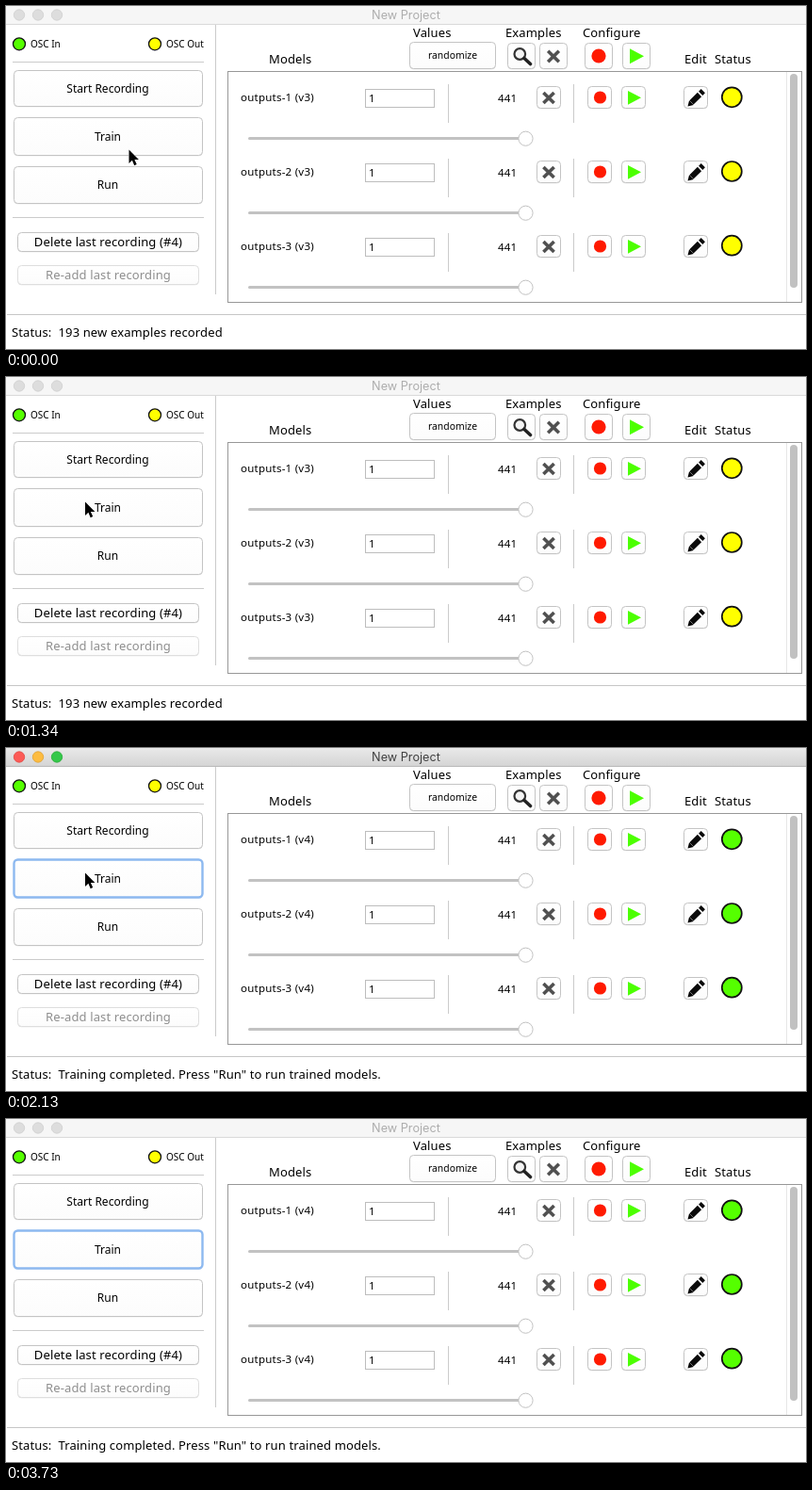
An HTML page for the animation above (3.83 s loop, 849 by 364 pixels).

```html
<!DOCTYPE html>
<html lang="en">
<head>
<meta charset="utf-8">
<title>New Project</title>
<style>
html, body { margin: 0; width: 100%; height: 100%; overflow: hidden; background: #fff; }
svg { display: block; width: 849px; height: 364px; }
text { font-family: "Noto Sans", "Open Sans", sans-serif; white-space: pre; fill: #000; }
.s10 { font-size: 10px; }
.s11 { font-size: 10.4px; }
.row { font-size: 11.5px; letter-spacing: .02em; }
.s12 { font-size: 12px; }
.s13 { font-size: 13px; letter-spacing: .01em; }
.title { font-family: Inter, Roboto, sans-serif; font-size: 12.7px; }
.mid { text-anchor: middle; }
</style>
</head>
<body>
<svg id="stage" viewBox="0 0 849 364">
  <defs>
    <linearGradient id="bar" x2="0" y2="1">
      <stop offset="0" stop-color="#e9e9e9"/><stop offset="1" stop-color="#d4d4d4"/>
    </linearGradient>
    <linearGradient id="face" x2="0" y2="1">
      <stop offset="0" stop-color="#fff"/><stop offset="1" stop-color="#fcfcfc"/>
    </linearGradient>
  </defs>
</svg>
<script>
const LOOP = 3830;
const GREEN = '#55ff00', YELLOW = '#ffff00', MAGENTA = '#ff00ff', RED = '#ff1a00';
const stage = document.getElementById('stage');

function add(tag, attrs, parent = stage) {
  const el = document.createElementNS('http://www.w3.org/2000/svg', tag);
  for (const k in attrs) el.setAttribute(k, attrs[k]);
  return parent.appendChild(el);
}
function label(str, x, y, cls, fill) {
  const el = add('text', { x, y, class: cls });
  el.textContent = str;
  if (fill) el.style.fill = fill;
  return el;
}
const box = (x, y, width, height, attrs) => add('rect', { x, y, width, height, ...attrs });
const dot = (cx, cy, r, fill, attrs) => add('circle', { cx, cy, r, fill, ...attrs });
const path = (d, attrs) => add('path', { d, ...attrs });
const hline = (x, y, w, fill = '#cbcbcb') => box(x, y, w, 1, { fill });
const vline = (x, y, h, fill = '#cbcbcb') => box(x, y, 1, h, { fill });

function button(x, y, w, h, edge = '#c4c4c4') {
  box(x + .5, y + 1.2, w - 1, h - 1, { rx: 4, fill: '#ddd' });
  return box(x + .5, y + .5, w - 1, h - 1, { rx: 4, fill: 'url(#face)', stroke: edge });
}
const cross = (x, y, r) => path(
  `M${x - r} ${y - r}L${x + r} ${y + r}M${x + r} ${y - r}L${x - r} ${y + r}`,
  { stroke: '#505050', 'stroke-width': 3.6 });
const play = (x, y, w, h) => path(`M${x} ${y - h}l${w} ${h}l${-w} ${h}z`, { fill: '#4cff00' });
const lamp = (x, y, r, fill, w) => dot(x, y, r, fill, { stroke: '#111', 'stroke-width': w });

// title bar
const bar = box(0, 0, 849, 20, {});
const barEdge = hline(0, 19, 849);
const lights = [14, 34, 54].map(x => dot(x, 9.5, 5.7, '#dcdcdc', { 'stroke-width': .8 }));
const title = label('New Project', 424.5, 14, 'title mid');

// left panel
lamp(14, 40.3, 6.5, GREEN, 1.3);
lamp(158, 40.3, 6.5, YELLOW, 1.3);
label('OSC In', 26, 44, 's10');
label('OSC Out', 170, 44, 's10');
hline(7, 59, 203);
hline(7, 224, 203);
vline(222, 20, 286);
button(8, 68, 201, 39);
label('Start Recording', 108, 92, 's12 mid');
button(8, 118, 201, 41);
const ring = box(8.5, 118.5, 200, 40, { rx: 4, fill: 'none', stroke: '#8db9f0', 'stroke-width': 2.4 });
const trainText = label('', 108, 143, 's12 mid');
button(8, 170, 201, 40);
const runText = label('Run', 108, 194, 's12 mid');
button(12, 240, 193, 21);
label('Delete last recording (#4)', 108.5, 255, 's13 mid');
button(12, 275, 193, 21, '#dedede');
label('Re-add last recording', 108.5, 290, 's13 mid', '#8e8e8e');

// table header
label('Models', 279, 61, 's13');
label('Values', 432, 33, 's13');
label('Examples', 530, 33, 's13');
label('Configure', 612, 33, 's13');
label('Edit', 720, 61, 's13');
label('Status', 752, 61, 's13');
button(428, 38, 92, 29);
label('randomize', 474, 56, 's11 mid');
for (const x of [532, 566, 614, 654]) button(x, 39, 30, 28);
dot(545.3, 51, 5.8, '#f4f4f4', { stroke: '#333', 'stroke-width': 2.2 });
path('M550 55.5L556.5 61.5', { stroke: '#222', 'stroke-width': 3.6, 'stroke-linecap': 'round' });
cross(581, 53.5, 5.8);
dot(629, 53, 7.6, RED);
play(662, 53.3, 15, 8);

// table
box(235.5, 69.5, 609, 245, { fill: 'none', stroke: '#989898' });
vline(828, 70, 244, '#e6e6e6');
box(832, 72, 8, 227, { rx: 4, fill: '#c1c1c1' });

const rows = [0, 1, 2].map(i => {
  const y = 79 * i;
  const name = label('', 249, 101 + y, 'row');
  box(381.5, 88.5 + y, 73, 19, { fill: '#fff', stroke: '#bdbdbd' });
  label('1', 385, 102 + y, 'row');
  vline(469, 83 + y, 41);
  label('441', 522, 102 + y, 'row');
  vline(602, 83 + y, 41);
  for (const x of [563, 617, 653, 719]) button(x, 85 + y, 26, 24);
  cross(576, 97.5 + y, 5.6);
  dot(630.5, 97 + y, 6.6, RED);
  play(660, 97.3 + y, 14, 7.4);
  path(`M723.5 ${106.5 + y}l1.6-6.2 4.6 4.6z`, { fill: '#000' });
  path(`M727.5 ${102.3 + y}l8.5-8.3M737.2 ${92.8 + y}l2.6-2.6`, { stroke: '#0a0a0a', 'stroke-width': 6 });
  box(257, 139 + y, 294, 3, { rx: 1.5, fill: '#c2c2c2' });
  dot(551.5, 140.7 + y, 7.6, '#fff', { stroke: '#c2c2c2' });
  return { name, lamp: lamp(770.3, 96.8 + y - i * .3, 10.5, YELLOW, 1.7) };
});

// status line
hline(1, 327, 848, '#c6c6c6');
label('Status:', 6, 351, 's13');
const status = label('', 55.5, 351, 's13');

const cursor = path('M0 0V14.4L3.4 11.3 5.7 16.7 8.2 15.6 5.9 10.4H10.4Z',
  { fill: '#000', stroke: '#fff', 'stroke-width': 1, 'paint-order': 'stroke' });

// [time, tip x, tip y]
const moves = [
  [0, 130.5, 152.5], [90, 128, 150], [180, 125, 148], [270, 124, 146],
  [540, 261, 273], [630, 251, 270], [900, 205, 236], [990, 144, 186],
  [1170, 104, 150], [1250, 88, 136], [1340, 84, 132.5],
  [2940, 628, 222], [3020, 809, 271], [3290, 812, 285], [3380, 819, 315],
  [3470, 826, 344], [3560, 826, 390]
];

// trained: finished models; busy: training in progress
const phases = [
  { at: 0, msg: '193 new examples recorded', trained: 0 },
  { at: 1420, msg: '193 new examples recorded', trained: 0, active: true, ring: true },
  { at: 1510, msg: 'Training in progress.', trained: 0, busy: true, active: true, ring: true },
  { at: 1690, trained: 1, busy: true, active: true, ring: true },
  { at: 1870, trained: 2, busy: true, active: true, ring: true },
  { at: 2040, trained: 3, busy: true, active: true, ring: true },
  { at: 2130, msg: 'Training completed. Press "Run" to run trained models.', trained: 3, active: true, ring: true },
  { at: 3730, msg: 'Training completed. Press "Run" to run trained models.', trained: 3, ring: true }
];

const lightColors = ['#fc5b57', '#fdbc40', '#34c84a'];
const lightEdges = ['#e2443f', '#e0a02e', '#25aa35'];

function show(p) {
  bar.setAttribute('fill', p.active ? 'url(#bar)' : '#f6f6f6');
  barEdge.setAttribute('fill', p.active ? '#b9b9b9' : '#dadada');
  title.style.fill = p.active ? '#404040' : '#adadad';
  lights.forEach((el, i) => {
    el.setAttribute('fill', p.active ? lightColors[i] : '#dddddd');
    el.setAttribute('stroke', p.active ? lightEdges[i] : '#cfcfcf');
  });
  ring.style.display = p.ring ? '' : 'none';
  trainText.textContent = p.busy ? 'Cancel training' : 'Train';
  trainText.style.fill = p.busy ? '#f00' : '#000';
  runText.style.fill = p.busy ? '#8e8e8e' : '#000';
  status.textContent = p.msg || `${p.trained} of 3 models trained, 0 errors encountered.`;
  rows.forEach((row, i) => {
    const done = i < p.trained;
    row.name.textContent = `outputs-${i + 1} (v${done ? 4 : 3})`;
    row.lamp.setAttribute('fill', done ? GREEN : p.busy && i === p.trained ? MAGENTA : YELLOW);
  });
}

let current;
function draw() {
  const t = performance.now() % LOOP;
  const phase = phases.findLast(p => p.at <= t);
  if (phase !== current) show(current = phase);
  const [, x, y] = moves.findLast(m => m[0] <= t);
  cursor.setAttribute('transform', `translate(${x} ${y})`);
  requestAnimationFrame(draw);
}
draw();
</script>
</body>
</html>
```
